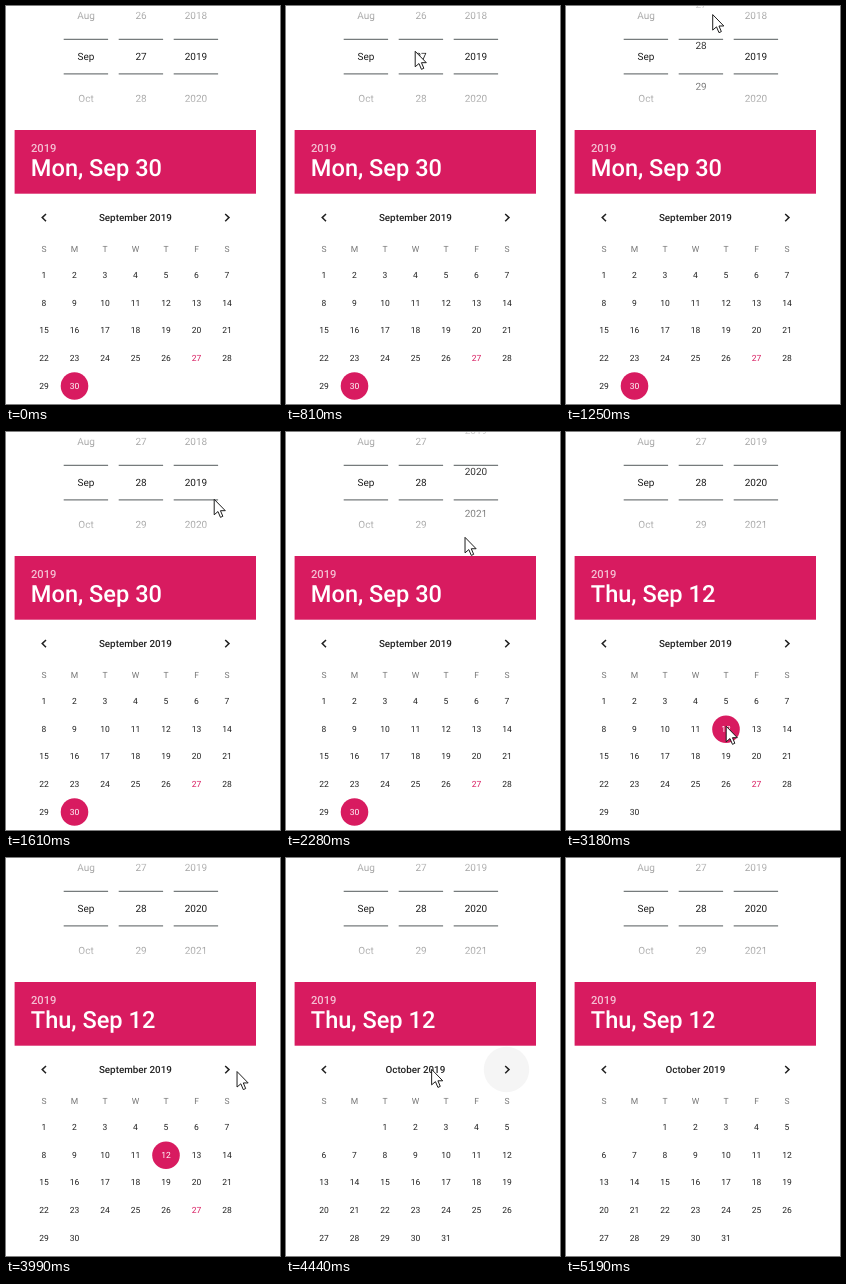
Animation, 274 px wide and 398 px high, one loop 5.9 s. Source, as an HTML page:

```html
<!DOCTYPE html>
<html lang="en">
<head>
<meta charset="utf-8">
<title>Date pickers</title>
<style>
  html, body { margin: 0; width: 100%; height: 100%; overflow: hidden; background: #fff; }
  svg { display: block; width: 100vw; height: 100vh; font-family: Roboto, sans-serif; text-rendering: geometricPrecision; }
</style>
</head>
<body>
<svg viewBox="0 0 274 398">
  <defs>
    <linearGradient id="fade" gradientUnits="userSpaceOnUse" x1="0" y1="-11" x2="0" y2="113">
      <stop offset="0" stop-color="#1e1e1e" stop-opacity="0"/>
      <stop offset=".46" stop-color="#1e1e1e"/>
      <stop offset=".54" stop-color="#1e1e1e"/>
      <stop offset="1" stop-color="#1e1e1e" stop-opacity="0"/>
    </linearGradient>
    <clipPath id="wheelClip"><rect width="274" height="97"/></clipPath>
    <clipPath id="pageClip"><rect x="9" y="188" width="241" height="210"/></clipPath>
  </defs>
  <rect width="274" height="398" fill="#fff"/>
  <g id="wheels" clip-path="url(#wheelClip)"></g>
  <rect x="8.6" y="124" width="241.4" height="63.7" fill="#d81b60"/>
  <g fill="#fff" font-weight="500">
    <text x="25" y="145.5" font-size="11.2" opacity=".72">2019</text>
    <text id="headline" x="24.8" y="170" font-size="23.6"></text>
  </g>
  <circle id="ripple" cx="220.5" cy="211.5" r="22.7" fill="#f5f5f5"/>
  <g clip-path="url(#pageClip)"><g id="pages"></g></g>
  <path d="M40 208L36.2 211.6L40 215.2M219.2 208L223 211.6L219.2 215.2" fill="none" stroke="#222" stroke-width="1.5"/>
  <g id="cursor">
    <path transform="scale(.95)" d="M.2 .3V16.6L4.2 13.2L6.8 19.3L9.3 18.2L6.8 12.3H11.9Z" fill="#fff" stroke="#111"/>
  </g>
</svg>
<script>
const LOOP = 5900, TICK = 74.1, ROW = 41.5, PAGE = 241, PINK = '#d81b60';
const $ = id => document.getElementById(id);

function add(parent, tag, attrs, text) {
  const el = document.createElementNS('http://www.w3.org/2000/svg', tag);
  for (const k in attrs) el.setAttribute(k, attrs[k]);
  if (text !== undefined) el.textContent = text;
  parent.appendChild(el);
  return el;
}

const linear = p => p;
const smooth = p => p * p * (3 - 2 * p);
const out = p => 1 - (1 - p) ** 2;
const brake = p => 1 - (1 - p) ** 3.5;
const ease = (t, a, b, fn = smooth) => fn(Math.min(1, Math.max(0, (t - a) / (b - a))));

// The picture is held for one tick at a time
const hold = t => Math.floor((t + 21) / TICK) * TICK - 11;

// Cursor moves: begin, end, x, y, easing
const moves = [
  [60, 500, 122, 75, out],
  [800, 801, 129, 45, linear],
  [805, 1180, 142, 4, smooth],
  [1180, 1610, 208, 67, smooth],
  [1830, 2150, 187, 1, out],
  [2170, 2440, 168, 243, linear],
  [2440, 3010, 160, 294, out],
  [3200, 3330, 165, 285, smooth],
  [3530, 4060, 232, 212, out],
  [4280, 4600, 136, 211, brake],
  [4790, 5150, 240, 398, smooth]
];

function cursorAt(t) {
  let x = 236, y = 281;
  for (const [a, b, toX, toY, fn] of moves) {
    const p = ease(t, a, b, fn);
    x += (toX - x) * p;
    y += (toY - y) * p;
  }
  return [x, y];
}

// Drag past the next value, then settle back on it
function spin(t, start) {
  const over = 53;
  return over * ease(t, start, start + 300) - (over - ROW) * ease(t, start + 350, start + 700);
}

function wheel(x, labels) {
  for (const y of [33.3, 67.8]) add($('wheels'), 'path', { d: `M${x - 22.3} ${y}h44.4`, stroke: '#767b7c', 'stroke-width': 1.3 });
  const items = labels.map(s => add($('wheels'), 'text',
    { x, 'text-anchor': 'middle', 'font-size': 10, fill: 'url(#fade)' }, s));
  return shift => items.forEach((el, i) => el.setAttribute('y', 54.4 + (i - 1) * ROW - shift));
}

const colX = c => 38 + c * 30.5;
const rowY = r => 269.1 + r * 27.6;

function month(x, title, first, count, today) {
  const g = add($('pages'), 'g', { transform: `translate(${x})`, 'text-anchor': 'middle', 'font-size': 8.5 });
  add(g, 'text', { x: 129.4, y: 215, 'font-size': 9.85, 'font-weight': 500, fill: '#222' }, title);
  [...'SMTWTFS'].forEach((s, c) => add(g, 'text', { x: colX(c), y: 246.1, fill: '#757575' }, s));
  const disc = add(g, 'circle', { r: 13.8, fill: PINK, visibility: 'hidden' });
  const days = [];
  for (let d = 1; d <= count; d++) {
    const n = d - 1 + first, x = colX(n % 7), y = rowY(Math.floor(n / 7));
    days[d] = { x, y, el: add(g, 'text', { x, y: y + 3 }, d) };
  }
  return picked => {
    days.forEach(({ x, y, el }, d) => {
      el.setAttribute('fill', d === picked ? '#fff' : d === today ? PINK : '#222');
      if (d !== picked) return;
      disc.setAttribute('cx', x);
      disc.setAttribute('cy', y + .5);
      disc.setAttribute('visibility', 'visible');
    });
  };
}

wheel(80, ['Aug', 'Sep', 'Oct'])(0);
const setDay = wheel(135, [26, 27, 28, 29, 30]);
const setYear = wheel(190, [2018, 2019, 2020, 2021, 2022]);
const pick = month(0, 'September 2019', 0, 30, 27);
month(PAGE, 'October 2019', 2, 31)(0);

function draw(time) {
  const t = hold(time);
  setDay(spin(t, 880));
  setYear(spin(t, 1910));
  const chosen = t >= 3170;
  pick(chosen ? 12 : 30);
  $('headline').textContent = chosen ? 'Thu, Sep 12' : 'Mon, Sep 30';
  $('pages').setAttribute('transform', `translate(${-PAGE * ease(t, 4275, 4385)})`);
  $('ripple').setAttribute('opacity', ease(t, 4260, 4380) - ease(t, 4500, 4600));
  $('cursor').setAttribute('transform', `translate(${cursorAt(t)})`);
  $('cursor').setAttribute('visibility', t >= 60 && t < 5170 ? 'visible' : 'hidden');
}

let start;
function tick(now) {
  if (start === undefined) start = now;
  draw((now - start) % LOOP);
  requestAnimationFrame(tick);
}
draw(0);
requestAnimationFrame(tick);
</script>
</body>
</html>
```
